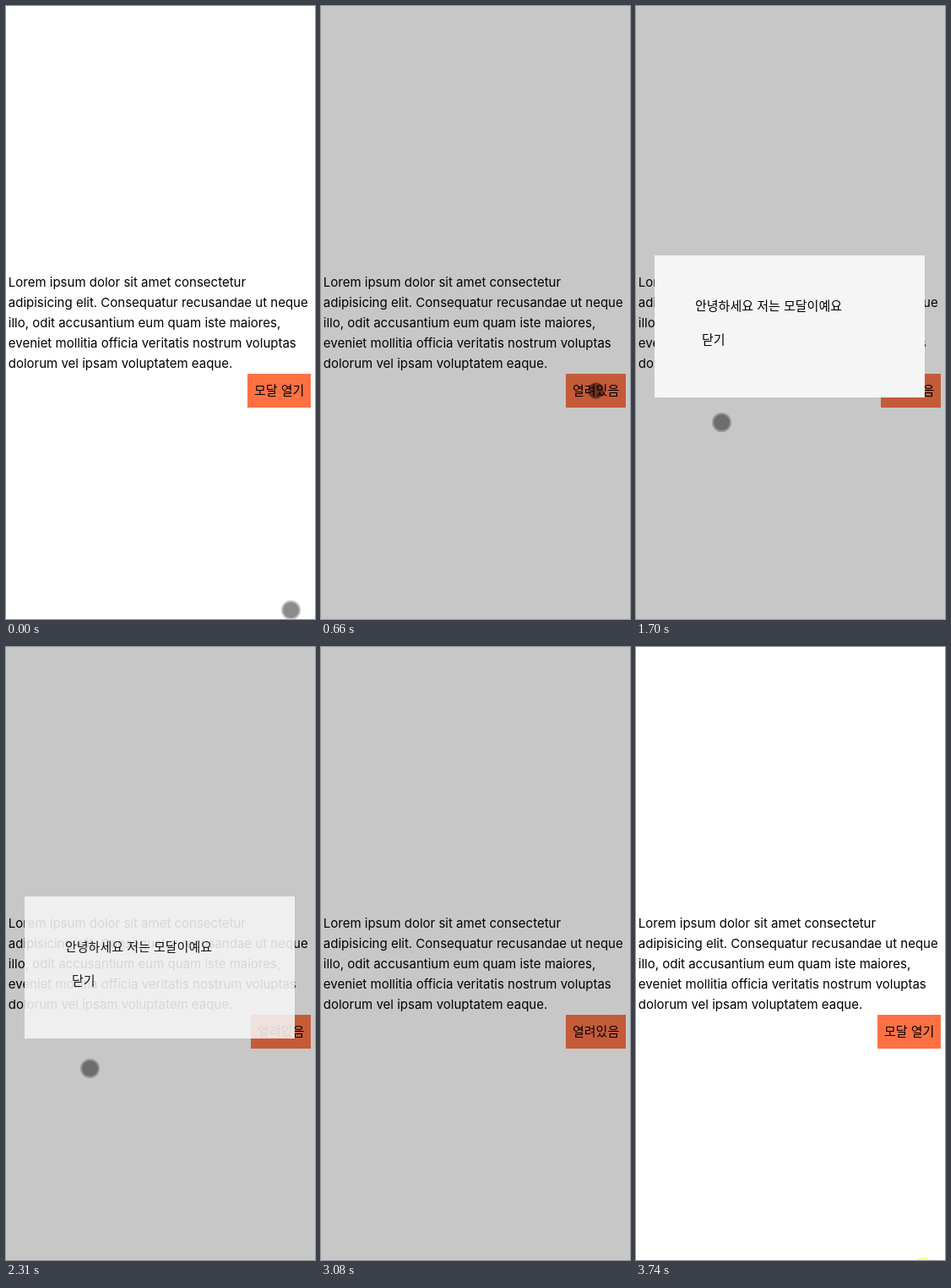
These frames come from a looping animation (366 px wide and 725 px high, 3820 ms). An HTML page:

```html
<!DOCTYPE html>
<html lang="ko">
<head>
<meta charset="utf-8">
<title>Modal</title>
<style>
  html, body { margin: 0; width: 100%; height: 100%; overflow: hidden; background: #fff; }
  svg { display: block; width: 100%; height: 100%; }
  .latin { font: 15px Inter, sans-serif; }
  .ko { font: 15px "Noto Sans CJK KR", "Noto Sans CJK", sans-serif; }
</style>
</head>
<body>
<svg viewBox="0 0 366 725">
  <rect id="page" width="366" height="725"/>
  <g class="latin" transform="translate(2.8 332)">
    <text>Lorem ipsum dolor sit amet consectetur</text>
    <text y="24">adipisicing elit. Consequatur recusandae ut neque</text>
    <text y="48">illo, odit accusantium eum quam iste maiores,</text>
    <text y="72">eveniet mollitia officia veritatis nostrum voluptas</text>
    <text y="96">dolorum vel ipsam voluptatem eaque.</text>
  </g>
  <rect id="button" y="435" height="40"/>
  <text id="label" class="ko" y="460"></text>
  <g id="modal">
    <rect x="22" y="295" width="320" height="168" fill="#f5f5f5"/>
    <text class="ko" x="70" y="360">안녕하세요 저는 모달이예요</text>
    <text class="ko" x="78" y="400">닫기</text>
  </g>
  <g id="cursor">
    <circle id="ring" r="11.5" fill-opacity=".24"/>
    <circle id="dot" r="9.5"/>
  </g>
  <circle id="entry" cx="340" cy="733.3" r="11.5" fill="#ffff7a"/>
</svg>
<script>
const LOOP = 3820, OPEN = 660, SHUT = 3160, ENTER = 3740;
const GROW = 666, FADE = 2193, DURATION = 1000;

const linear = t => t;
const easeIn = t => t * t;

// Where the pointer starts, rests and leaves
const BELOW = [337.5, 715], BUTTON = [325.5, 455], NEAR = [101.5, 492.5],
  BACKDROP = [99.5, 498.5], AWAY = [400, 755];

// Each leg is a quadratic curve bent towards `via`
const LEGS = [
  { start: 0, end: 500, from: BELOW, via: [350, 590], to: BUTTON, pace: linear },
  { start: 700, end: 1700, from: BUTTON, via: [259, 744], to: NEAR, pace: linear },
  { start: 1700, end: 1830, from: NEAR, via: NEAR, to: BACKDROP, pace: linear },
  { start: 2560, end: 2940, from: BACKDROP, via: [270, 672], to: AWAY, pace: easeIn }
];

const $ = id => document.getElementById(id);
const set = (id, attrs) => {
  for (const key in attrs) $(id).setAttribute(key, attrs[key]);
};
const show = (id, on) => set(id, { visibility: on ? 'visible' : 'hidden' });
const within = (t, a, b) => t >= a && t < b;
const clamp = v => Math.min(1, Math.max(0, v));

// cubic-bezier(.25, .1, .25, 1), solved by bisection
function ease(t) {
  t = clamp(t);
  let lo = 0, hi = 1;
  for (let i = 0; i < 24; i++) {
    const s = (lo + hi) / 2;
    if (.75 * s * (1 - s) + s ** 3 < t) lo = s; else hi = s;
  }
  const s = (lo + hi) / 2, r = 1 - s;
  return .3 * s * r * r + 3 * r * s * s + s ** 3;
}

function pointer(t) {
  const { start, end, from, via, to, pace } = LEGS.findLast(leg => leg.start <= t);
  const u = pace(clamp((t - start) / (end - start))), v = 1 - u;
  return from.map((p, i) => v * v * p + 2 * u * v * via[i] + u * u * to[i]);
}

function draw(t) {
  const open = within(t, OPEN, SHUT);
  const left = open ? 290 : 286;
  set('page', { fill: open ? '#c7c7c7' : '#fff' });
  set('button', { x: left, width: 361 - left, fill: open ? '#c45b38' : '#ff7043' });
  set('label', { x: left + 8 });
  $('label').textContent = open ? '열려있음' : '모달 열기';

  show('modal', open);
  set('modal', {
    transform: `translate(182 379) scale(${ease((t - GROW) / DURATION)}) translate(-182 -379)`,
    opacity: 1 - ease((t - FADE) / DURATION)
  });

  const pressed = within(t, 560, 700) || within(t, 2030, 2200);
  set('cursor', { transform: `translate(${pointer(t)})` });
  show('ring', !pressed);
  set('dot', { 'fill-opacity': pressed ? .46 : .28 });
  show('entry', t >= ENTER);
}

const begin = performance.now();
function frame() {
  draw((performance.now() - begin) % LOOP);
  requestAnimationFrame(frame);
}
frame();
</script>
</body>
</html>
```
